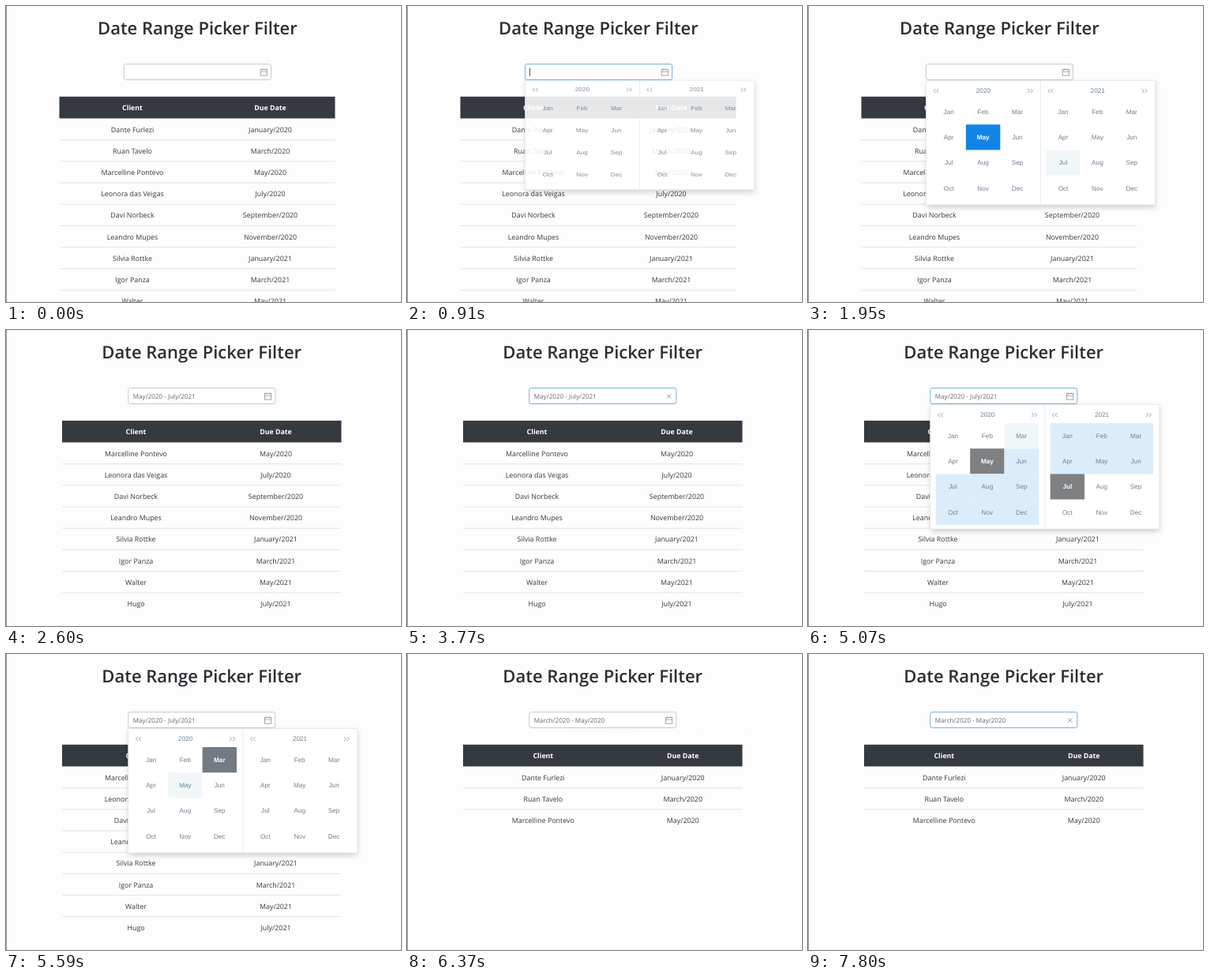
An HTML page with a canvas for the animation above (8 s loop, 500 px wide and 375 px high).

```html
<!DOCTYPE html>
<html lang="en">
<head>
<meta charset="utf-8">
<title>Date Range Picker Filter</title>
<style>
  html, body { margin: 0; width: 100%; height: 100%; overflow: hidden; background: #fdfdfd; }
  canvas { display: block; width: 500px; height: 375px; }
</style>
</head>
<body>
<canvas id="stage"></canvas>
<script>
const LOOP = 8000, TICK = 130;
const canvas = document.getElementById('stage');
const ctx = canvas.getContext('2d');
const dpr = window.devicePixelRatio || 1;
canvas.width = 500 * dpr;
canvas.height = 375 * dpr;
ctx.textRendering = 'geometricPrecision';

const SANS = '"Open Sans", "Noto Sans", sans-serif';
const ARIAL = '"Liberation Sans", Arial, sans-serif';
const MONTHS = 'Jan Feb Mar Apr May Jun Jul Aug Sep Oct Nov Dec'.split(' ');
const DUE = ['January', 'March', 'May', 'July', 'September', 'November'];
const CLIENTS = ['Dante Furlezi', 'Ruan Tavelo', 'Marcelline Pontevo', 'Leonora das Veigas',
  'Davi Norbeck', 'Leandro Mupes', 'Silvia Rottke', 'Igor Panza', 'Walter', 'Hugo'];
const ROWS = CLIENTS.map((name, i) => [name, `${DUE[i % 6]}/${2020 + Math.floor(i / 6)}`]);

// Months count from January 2020.
const MAR = 2, MAY = 4, JUL_NEXT = 18;
const VIEWS = [
  { from: 0, shift: 0, table: [67.5, 416.5], cols: [160, 334.5], rows: ROWS, value: '' },
  { from: 2320, shift: 5.3, table: [71, 424.5], cols: [164.5, 341.5], rows: ROWS.slice(2), value: 'May/2020 - July/2021' },
  { from: 6220, shift: 5.3, table: [71, 424.5], cols: [172.3, 349.2], rows: ROWS.slice(0, 3), value: 'March/2020 - May/2020' }
];
const POPUPS = [
  { open: 810, close: 2320, x: 149.5 },
  { open: 4395, close: 6220, x: 154.8 }
];
const PICKS = [
  { from: 0 },
  { from: 1430, hover: MAY },
  { from: 1690, range: [MAY, MAY], fill: '#1284e7' },
  { from: 1950, range: [MAY, MAY], fill: '#1284e7', hover: JUL_NEXT },
  { from: 2320, range: [MAY, JUL_NEXT], fill: '#1284e7' },
  { from: 4390, range: [MAY, JUL_NEXT], fill: '#7e8082' },
  { from: 5070, range: [MAY, JUL_NEXT], fill: '#7e8082', hover: MAR },
  { from: 5460, range: [MAR, MAR], fill: '#727a83' },
  { from: 5590, range: [MAR, MAR], fill: '#727a83', hover: MAY },
  { from: 6220, range: [MAR, MAY], fill: '#727a83' }
];
const HOVERS = [[520, 1170], [3770, 5070], [7800, LOOP]];
const FOCUSES = [[780, 1690], [4420, 5460]];

const latest = (list, t) => list.filter(s => t >= s.from).pop();
const spanAt = (spans, t) => spans.find(([a, b]) => t >= a && t < b);

// cubic-bezier(.23, 1, .32, 1) over 300 ms
function ease(ms) {
  const x = Math.min(1, Math.max(0, ms / 300));
  let lo = 0, hi = 1;
  for (let i = 0; i < 24; i++) {
    const s = (lo + hi) / 2, r = 1 - s;
    if (3 * r * r * s * .23 + 3 * r * s * s * .32 + s * s * s < x) lo = s; else hi = s;
  }
  return 1 - (1 - lo) ** 3;
}

function text(str, x, y, font, color, align = 'center') {
  ctx.font = font;
  ctx.fillStyle = color;
  ctx.textAlign = align;
  ctx.fillText(str, x, y);
}

function rect(x, y, w, h, color) {
  ctx.fillStyle = color;
  ctx.fillRect(x, y, w, h);
}

function path(color, width, ...lines) {
  ctx.strokeStyle = color;
  ctx.lineWidth = width;
  ctx.beginPath();
  for (const [x, y, ...rest] of lines) {
    ctx.moveTo(x, y);
    for (let i = 0; i < rest.length; i += 2) ctx.lineTo(rest[i], rest[i + 1]);
  }
  ctx.stroke();
}

function drawTable({ table: [left, right], cols, rows }) {
  const pitch = 27.2, top = 142.4;
  rect(left, 114.8, right - left, top - 114.8, '#343a40');
  ['Client', 'Due Date'].forEach((s, i) => text(s, cols[i], 132.2, `bold 8.8px ${SANS}`, '#fff'));
  rows.forEach((row, r) => {
    const y = top + r * pitch;
    if (r) rect(left, y - .5, right - left, 1, '#e2e4e6');
    row.forEach((s, i) => text(s, cols[i], y + 17.1, `8.9px ${SANS}`, '#34383c'));
  });
}

function drawInput(view, t) {
  const x = 149.5 + view.shift, hover = spanAt(HOVERS, t), focus = spanAt(FOCUSES, t);
  ctx.beginPath();
  ctx.roundRect(x, 73.6, 186, 19.9, 2.3);
  ctx.fillStyle = '#fff';
  ctx.fill();
  ctx.strokeStyle = hover || focus ? '#78b0d8' : '#c9c9c9';
  ctx.lineWidth = 1;
  ctx.stroke();
  text(view.value, x + 6, 87, `8.1px ${SANS}`, '#666', 'left');
  if (focus && t - focus[0] < 530) {
    rect(x + 5.5 + ctx.measureText(view.value).width, 78.5, 1, 10.5, '#555');
  }
  const cx = x + 176.8, cy = 84;
  if (hover && view.value) {
    path('#888', .9, [cx - 2.6, cy - 2.6, cx + 2.6, cy + 2.6], [cx + 2.6, cy - 2.6, cx - 2.6, cy + 2.6]);
  } else {
    ctx.strokeStyle = '#999';
    ctx.lineWidth = .9;
    ctx.strokeRect(cx - 4.1, cy - 3.5, 8.2, 7.6);
    path('#999', .8, [cx - 4, cy - .8, cx + 4, cy - .8],
      [cx - 2, cy - 4.8, cx - 2, cy - 2.6], [cx + 2, cy - 4.8, cx + 2, cy - 2.6]);
  }
}

function drawArrows(x, y, dir) {
  for (const dx of [-2.4, 1.4]) {
    const tip = x + dx + .5 + dir * 1.3, back = tip - dir * 2.6;
    path('#8490a0', .85, [back, y - 2.6, tip, y, back, y + 2.6]);
  }
}

function drawCell(month, x, y, { range, fill, hover }) {
  const w = 43.4, h = 32.2;
  let color = '#6f7f91', weight = 'normal';
  if (range && range.includes(month)) {
    rect(x, y, w, h, fill);
    color = '#fff';
    weight = 'bold';
  } else if (range && month > range[0] && month < range[1]) {
    rect(x, y, w + .2, h + .2, '#dbedfb');
  } else if (month === hover) {
    rect(x, y, w, h, '#f1f7f9');
  }
  text(MONTHS[month % 12], x + w / 2, y + 18.9, `${weight} 8.2px ${ARIAL}`, color);
}

// The shadow stays outside the panel, so a fading panel is not darkened.
function drawPanel(w, h) {
  ctx.save();
  ctx.beginPath();
  ctx.rect(-20, -20, w + 40, h + 40);
  ctx.rect(0, 0, w, h);
  ctx.clip('evenodd');
  ctx.shadowColor = 'rgba(0,0,0,.2)';
  ctx.shadowBlur = 7 * dpr;
  ctx.shadowOffsetY = 3 * dpr;
  rect(0, 0, w, h, '#fff');
  ctx.restore();
  rect(0, 0, w, h, '#fff');
  ctx.strokeStyle = '#e4e4e4';
  ctx.lineWidth = .7;
  ctx.strokeRect(0, 0, w, h);
  path('#e6e6e6', .8, [w / 2, 0, w / 2, h]);
}

function drawPopup({ x, open, close }, t) {
  const grow = t < close ? ease(t - open) : 1 - ease(t - close);
  if (grow < .004) return;
  ctx.save();
  ctx.globalAlpha = grow;
  ctx.translate(x, 94.3);
  ctx.scale(1, grow);
  drawPanel(290, 157.7);
  const pick = latest(PICKS, t);
  for (const year of [0, 1]) {
    const px = year * 144.8;
    drawArrows(px + 12.8, 13.3, -1);
    drawArrows(px + 131.6, 13.3, 1);
    text(2020 + year, px + 72.4, 15.8, `8.2px ${ARIAL}`, '#6f7f91');
    for (let m = 0; m < 12; m++) {
      drawCell(year * 12 + m, px + 7 + m % 3 * 43.4, 23.7 + Math.floor(m / 3) * 32.2, pick);
    }
  }
  ctx.restore();
}

function draw() {
  const now = performance.now() % LOOP;
  const t = Math.floor(now / TICK) * TICK;
  const view = latest(VIEWS, t);
  ctx.setTransform(dpr, 0, 0, dpr, 0, 0);
  rect(0, 0, 500, 375, '#fdfdfd');
  rect(0, 0, 1, 375, '#8c8c8c');
  text('Date Range Picker Filter', 242.4 + view.shift, 35.5, `600 22px ${SANS}`, '#2a2e32');
  drawTable(view);
  drawInput(view, t);
  POPUPS.filter(p => t >= p.open && t < p.close + 300).forEach(p => drawPopup(p, t));
  requestAnimationFrame(draw);
}
draw();
</script>
</body>
</html>
```
